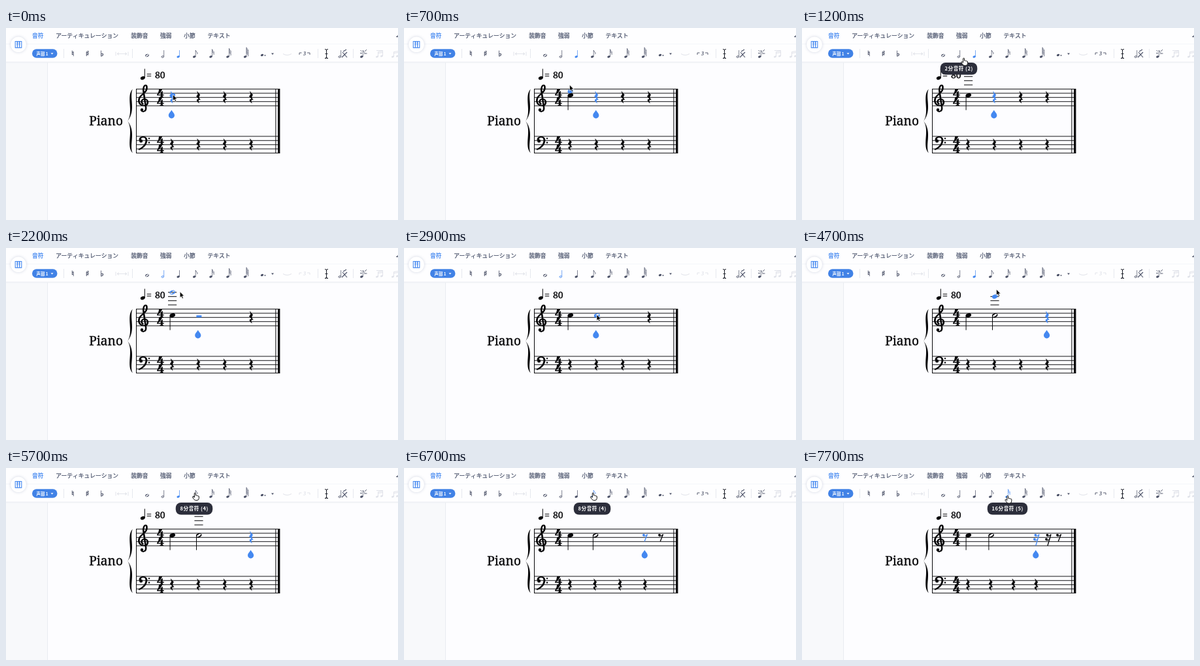
An HTML page with a canvas that plays this animation: 600x294 px, repeating every 8000 ms.

```html
<!DOCTYPE html>
<html lang="ja">
<head>
<meta charset="utf-8">
<title>Score editor</title>
<style>
html, body { margin: 0; width: 100%; height: 100%; overflow: hidden; background: #fdfdff; }
canvas { display: block; width: 100vw; height: 100vh; }
</style>
</head>
<body>
<canvas id="stage"></canvas>
<script>
const W = 600, H = 294, LOOP = 8000, STEP = 100;
const canvas = document.getElementById('stage');
const ratio = window.devicePixelRatio || 1;
canvas.width = W * ratio;
canvas.height = H * ratio;
const ctx = canvas.getContext('2d');

const BLUE = '#4488f0', INK = '#060608', ICON = '#4a5066', PALE = '#e0e2e9', RULE = '#e6e8ee';
const CJK = '"Noto Sans CJK JP", "Noto Sans CJK", sans-serif';
const SERIF = '"Noto Serif", serif';
const LEFT = 199, RIGHT = 419, TREBLE = 93.5, BASS = 165.9, SPACE = 6.4;
const MID = TREBLE + 2 * SPACE, BASS_MID = BASS + 2 * SPACE;
const BOTTOM = BASS + 4 * SPACE;
const NOTE_Y = TREBLE + 1.5 * SPACE;

// Moments of the clicks
const PLACE_QUARTER = 300, PICK_HALF = 1800, PLACE_HALF = 3000,
      PICK_EIGHTH = 6100, PICK_SIXTEENTH = 7500;

// The pointer rests at one place, then eases to the next, a little bowed
const HOME = { x: 255.5, y: 102 };
const MOVES = [
  { from: 400, to: 1300, x: 247.5, y: 44, bow: 0 },
  { from: 1900, to: 2600, x: 295, y: 102, bow: 0 },
  { from: 3900, to: 5300, x: 289.5, y: 38, bow: 6 },
  { from: 6800, to: 7300, x: 315, y: 42.5, bow: 0 }
];

function pointer(t) {
  let { x, y } = HOME;
  for (const m of MOVES) {
    const p = Math.max(0, Math.min(1, (t - m.from) / (m.to - m.from)));
    const k = p * p * (3 - 2 * p);
    x += (m.x - x) * k + m.bow * Math.sin(Math.PI * p);
    y += (m.y - y) * k;
  }
  return [x, y];
}

const G_CLEF = new Path2D('M7.4 4C3.4 .6 5.6-4 10-4C16-4 16.6 6 9 6C-.4 6-.4-4 4-8.6C9-13.6 14-16 13.2-22.5C12.5-28 8-25 7.9-17.5L11.8 9C12.6 16.2 5 16.4 5 13');
const F_CLEF = new Path2D('M3.6 .6C.4-1 2.4-5.6 7-5.6C14.6-5.6 14.2 7 1 13.6');
const FOUR = new Path2D('M3.2 0H8.2Q6.5 5 1.8 8.4H5.8V5.2L8.8 2.6V8.4H10.8V9.8H8.8V11Q8.8 12.1 10.2 12.1V12.8H4.2V12.1Q5.8 12.1 5.8 11V9.8H0V8.8Q3 5 3.2 0Z');
const REST = new Path2D('M-1.6-9.3L2.9-3.9C.6-1.6 .8 .4 3.6 4C.4 3-.8 5.4 1.6 8.6L1.2 9C-3.4 6-3.6 2.2 .6 2.6L-3.2-1.8C-.2-4.2-.6-6.2-2.2-8.8Z');
const DROP = new Path2D('M0-6.6C1.2-4 4.6-1.4 4.6 1.8A4.6 4.6 0 0 1-4.6 1.8C-4.6-1.4-1.2-4 0-6.6Z');
const ARROW = new Path2D('M0 0V9.4L2.1 7.3 3.6 10.6 5.2 9.9 3.7 6.7H6.6Z');
const HAND = new Path2D('M-1.2 7V1Q-.2-1.4 .8 1V4Q2.2 3.4 2.6 4.4 4 3.8 4.3 4.9 5.8 4.6 5.8 6V8.5Q5.8 11.5 2.5 11.5H1Q-1 11.5-2.2 9.4L-4 6.8Q-4.2 5.4-2.8 5.8Z');
const CARET = new Path2D('M-2-1H2L0 1.4Z');
const BRACE = new Path2D('M7.6-49C-3-38 9.6-15 0 0C13.4-17 2-36 7.6-49Z');
BRACE.addPath(new Path2D(BRACE), new DOMMatrix([1, 0, 0, -1, 0, 0]));

function rect(x, y, w, h, color) {
  ctx.fillStyle = color;
  ctx.fillRect(x, y, w, h);
}
function pill(x, y, w, h, r, color) {
  ctx.fillStyle = color;
  ctx.beginPath();
  ctx.roundRect(x, y, w, h, r);
  ctx.fill();
}
function shape(path, x, y, color, outline, width) {
  ctx.save();
  ctx.translate(x, y);
  ctx.fillStyle = color;
  ctx.fill(path);
  if (outline) {
    ctx.strokeStyle = outline;
    ctx.lineWidth = width;
    ctx.stroke(path);
  }
  ctx.restore();
}
// Broad-nib stroke: thick where the path runs upright
function nib(path, x, y, breadth) {
  ctx.save();
  ctx.lineCap = 'round';
  ctx.strokeStyle = INK;
  ctx.lineWidth = 1.1;
  ctx.translate(x - breadth / 2, y);
  for (let i = 0; i < 4; i++) {
    ctx.stroke(path);
    ctx.translate(breadth / 3, 0);
  }
  ctx.restore();
}
function line(d, color, width = 1) {
  ctx.strokeStyle = color;
  ctx.lineWidth = width;
  ctx.stroke(new Path2D(d));
}
function dot(x, y, r, color) {
  ctx.fillStyle = color;
  ctx.beginPath();
  ctx.arc(x, y, r, 0, 7);
  ctx.fill();
}
function text(s, x, y, font, color, align = 'left', weight = 0) {
  ctx.font = font;
  ctx.fillStyle = ctx.strokeStyle = color;
  ctx.textAlign = align;
  ctx.fillText(s, x, y);
  ctx.lineWidth = weight;
  if (weight) ctx.strokeText(s, x, y);
}
function head(x, y, rx, color, hollow) {
  ctx.beginPath();
  ctx.ellipse(x, y, rx, rx * 0.7, -0.35, 0, 7);
  if (hollow) ctx.ellipse(x, y, rx * 0.85, rx * 0.3, -0.6, 0, 7);
  ctx.fillStyle = color;
  ctx.fill('evenodd');
}

// ---- toolbar ----
function toolNote(x, color, flags = 0, hollow = false) {
  const top = 34 - Math.max(0, flags - 1) * 1.4;
  head(x - 1.2, 44, 2.3, color, hollow);
  rect(x + .4, top, .7, 44 - top, color);
  for (let i = 0; i < flags; i++) line(`M${x + .8} ${top + i * 2.5}q.4 2 2 3t.4 3`, color, .8);
}
function beamed(x, color) {
  head(x - 4, 44, 2, color);
  head(x + 3, 43, 2, color);
  line(`M${x - 2.4} 44V36.5l7-1V43m-7-4.5l7-1`, color);
}

function toolbar(picked, tripletOn) {
  rect(0, 0, W, 52, '#fefeff');
  rect(0, 52, 63, H - 52, '#f8f9fb');
  rect(0, 24, W, 1, '#f5f6f9');
  rect(0, 51.5, W, 2, '#f0f1f5');
  rect(63, 53, 1, H - 53, '#e9ebf0');

  ctx.save();
  ctx.shadowColor = 'rgba(70,90,140,.25)';
  ctx.shadowBlur = 4 * ratio;
  dot(19, 25.3, 11.8, '#fff');
  ctx.restore();
  line('M14.2 20.5h9.6v9.6h-9.6zM17.4 25v5M20.6 25v5', BLUE, 1.1);
  line('M17.4 20.5v6M20.6 20.5v6', BLUE, 1.7);

  const size = 8.75;
  let x = 40;
  for (const tab of ['音符', 'アーティキュレーション', '装飾音', '強弱', '小節', 'テキスト']) {
    text(tab, x, 15.4, `500 ${size}px ${CJK}`, x === 40 ? BLUE : '#4b546c', 'left', .25);
    x += tab.length * size + 18.7;
  }
  line('M601 10.5l-3.5 3h4.5', ICON);

  pill(40, 32.3, 38.5, 13.4, 6.7, '#4182e6');
  text('声部 1', 46.5, 41.5, `700 6.4px ${CJK}`, '#fff');
  shape(CARET, 70.5, 39.2, '#fff');
  for (const bar of [88, 193, 477, 531]) rect(bar, 32, 1, 14, RULE);

  [...'♮♯♭'].forEach((s, i) =>
    text(s, 102 + 22.5 * i, 43, '11.5px "DejaVu Sans", sans-serif', ICON, 'center', .4));
  line('M168 36.5v6M187 36.5v6M170 39.5h15m-12-2l-3 2 3 2m9-4l3 2-3 2', PALE, .9);

  head(216, 42, 2.9, ICON, true);
  ['half', 'quarter', 'eighth', 'sixteenth', '32nd', '64th'].forEach((name, i) =>
    toolNote(241 + 23.5 * i + .35 * i * i, name === picked ? BLUE : ICON, Math.max(0, i - 1), i === 0));
  head(392, 41.5, 2.3, ICON);
  dot(396.5, 42, .9, ICON);
  shape(CARET, 408, 39.5, ICON);
  line('M424 39.5q6 4 13 0', PALE);

  const trip = tripletOn ? ICON : PALE;
  line('M449 41v-3h3.5m8.5 0h4v3', trip, .9);
  text('3', 457, 42, 'italic 700 8px "Liberation Serif", serif', trip, 'center');

  line('M488 32.5q2.5 0 2.5 2v10q0 2-2.5 2m5-14q-2.5 0-2.5 2m0 10q0 2 2.5 2m-4.5-7h4', '#22252f', 1.1);
  toolNote(512, ICON, 0, true);
  line('M515 37l7 8m0-8l-8 8m2-9l5-3', ICON, 1.1);
  toolNote(545.5, ICON, 1);
  line('M542.5 34l2 2m4.5 0l3-3m-2.5 6h3m-10.5-.5h3', ICON, .9);
  beamed(572, PALE);
  line('M567 34.5h10', PALE);
  beamed(596, PALE);
}

// ---- score ----
function staff(top) {
  for (let i = 0; i < 5; i++) rect(LEFT, top + i * SPACE - .5, RIGHT - LEFT, 1, '#161618');
}
function scoreNote(x, hollow) {
  head(x, NOTE_Y, 4.4, INK, hollow);
  rect(x - 4.2, NOTE_Y + .6, 1, 22, INK);
}
function flaggedRest(x, flags, color) {
  const y = MID - 3.2, low = y + 3.1 + flags * SPACE;
  line(`M${x + 3.6} ${y - 1.5}L${x - flags * .8} ${low}`, color, 1.3);
  for (let i = 0; i < flags; i++) {
    const fx = x - i * 1.5, fy = y + i * SPACE;
    dot(fx - 2, fy - .4, 1.9, color);
    line(`M${fx - 2.6} ${fy + .7}q3.6 1.5 6-1.9`, color, 1.1);
  }
}

function frame() {
  staff(TREBLE);
  staff(BASS);
  const height = BOTTOM - TREBLE + 1;
  rect(LEFT, TREBLE - .5, 1, height, INK);
  rect(412.4, TREBLE - .5, 1, height, INK);
  rect(416, TREBLE - .5, 3.4, height, INK);
  shape(BRACE, 186.2, (TREBLE + BOTTOM) / 2, INK);
  text('Piano', 127.2, 149.3, `19.1px ${SERIF}`, INK, 'left', .35);

  head(209.3, 76.6, 3.6, INK);
  rect(211.8, 62.5, 1, 14, INK);
  text('=', 214.8, 77.3, `700 15px ${SERIF}`, INK);
  text('80', 228, 77.2, `14px ${SERIF}`, INK, 'left', .35);

  nib(G_CLEF, 202.3, TREBLE + 3 * SPACE, 1.5);
  dot(208, TREBLE + 3 * SPACE + 12.6, 2.2, INK);
  nib(F_CLEF, 203, BASS + SPACE, 1.8);
  dot(206.6, BASS + SPACE + .6, 2.5, INK);
  for (const k of [.5, 1.5]) dot(219, BASS + SPACE * k, 1.2, INK);
  for (const y of [TREBLE, MID, BASS, BASS_MID]) shape(FOUR, 231, y, INK);
}

function score(t, cols) {
  frame();
  cols.forEach(x => shape(REST, x, BASS_MID, INK));

  const current = t < PLACE_QUARTER ? 0 : t < PLACE_HALF ? 1 : 3;
  const firstRest = t >= PICK_HALF ? 3 : current;
  if (current > 0) scoreNote(cols[0] + .8);
  if (current > 1) scoreNote(cols[1] + .8, true);
  else if (t >= PICK_HALF) rect(cols[1] - 3, MID - 3.2, 8, 3.2, BLUE);

  if (t < PICK_EIGHTH) {
    for (let i = firstRest; i < 4; i++) shape(REST, cols[i], MID, i === current ? BLUE : INK);
  } else {
    const flags = t < PICK_SIXTEENTH ? 1 : 2;
    flaggedRest(cols[3] + flags - 1, flags, BLUE);
    if (flags === 2) flaggedRest(377.5, 2, INK);
    flaggedRest(393, 1, INK);
  }
  shape(DROP, cols[current] - .6, 132, BLUE);
}

// Note trailing the pointer, snapped to a column and a staff step
function preview(t, cols, hollow) {
  if (t >= PICK_EIGHTH || (t >= PICK_HALF && t < 2100)) return;
  const [px] = pointer(t), [, py] = pointer(t - 150);
  const x = cols.reduce((a, b) => Math.abs(b - px) < Math.abs(a - px) ? b : a) + .8;
  const step = Math.max(-8, Math.round((py - TREBLE) / (SPACE / 2)));
  for (let s = -2; s >= step; s -= 2) rect(x - 6.8, TREBLE + s * SPACE / 2 - .5, 13.2, 1, INK);
  head(x, TREBLE + step * SPACE / 2, 4.4, BLUE, hollow);
}

function tooltip(label, x, width) {
  pill(x - width / 2, 53, width, 18.5, 8, '#2c2e3b');
  ctx.letterSpacing = '0.5px';
  text(label, x + .2, 65.2, `700 7.6px ${CJK}`, '#fff', 'center');
  ctx.letterSpacing = '0px';
}

function draw(t) {
  ctx.setTransform(canvas.width / W, 0, 0, canvas.height / H, 0, 0);
  rect(0, 0, W, H, '#fdfdff');
  const gap = t < PICK_EIGHTH ? 40.4 : t < PICK_SIXTEENTH ? 38.3 : 34.8;
  const cols = [0, 1, 2, 3].map(i => 254 + i * gap);
  const picked = t < PICK_HALF ? 'quarter' : t < PLACE_HALF ? 'half'
    : t < PICK_EIGHTH ? 'quarter' : t < PICK_SIXTEENTH ? 'eighth' : 'sixteenth';

  toolbar(picked, t < PICK_HALF || t >= PICK_EIGHTH);
  score(t, cols);
  preview(t, cols, picked === 'half');

  const [x, y] = pointer(t);
  if (y < 53) {
    if (x < 270) tooltip('2分音符 (2)', 240, 56.5);
    else if (x < 302) tooltip('8分音符 (4)', 288, 56.5);
    else tooltip('16分音符 (5)', 314.5, 61.5);
    shape(HAND, x, y, '#fff', '#111', 1);
  } else {
    shape(ARROW, x, y, '#000', '#fff', .7);
  }
}

const start = performance.now();
function tick() {
  const t = (performance.now() - start) % LOOP;
  draw(Math.floor(t / STEP) * STEP);
  requestAnimationFrame(tick);
}
tick();
</script>
</body>
</html>
```
